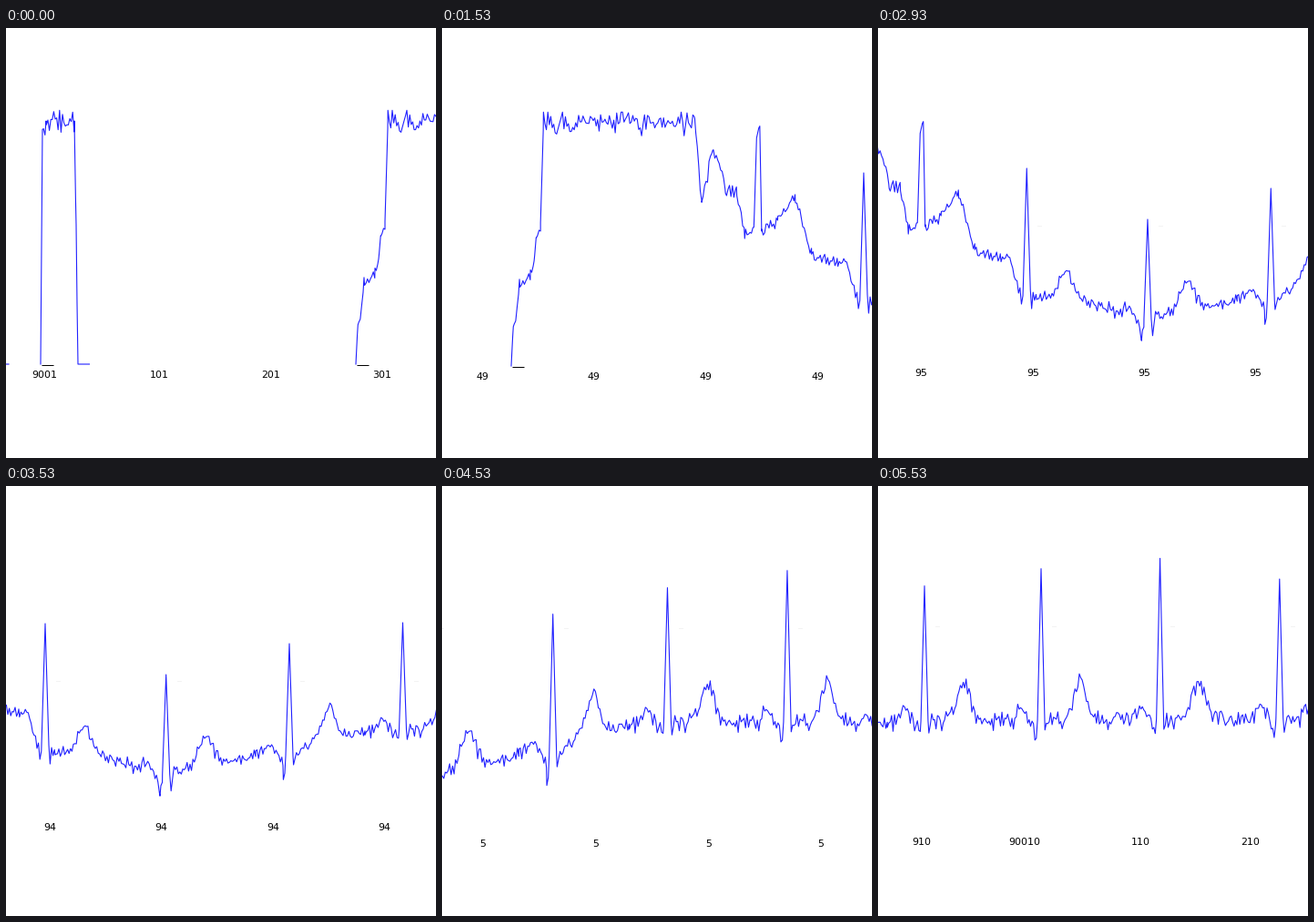
A matplotlib script that plays this animation: 472 by 472 pixels, repeating every 5.6 s.

```python
import matplotlib.pyplot as plt
import numpy as np
from matplotlib.animation import FuncAnimation

SIZE, LOOP = 472, 5600
TICK, STEPS = 20, 84  # clock tick in ms, scroll steps per loop
SAMPLE = 1.223        # pixels per sample
PX = 0.72             # points per pixel at 100 dpi
rng = np.random.default_rng(4)

# Outline of the trace: (position, height above the axis) in pixels
BLOCK = [(38, 0), (40, 251), (44, 267), (75, 267), (77, 150), (79, 0), (91.5, 0)]
RISE = [(384, 0), (386.3, 46), (389, 53), (393, 88), (405, 100), (409, 112),
        (411.5, 140), (416, 152), (419, 267), (584.5, 267)]
FALL = [(592, 179), (604, 238), (612, 222), (618, 190), (630, 195),
        (639, 143), (649, 145), (652, 255), (655.5, 264), (657.5, 148),
        (675, 160), (694, 183), (712, 122), (740, 111), (763, 82)]
REST = [(780, 72), (850, 62), (895, 45), (935, 55), (1000, 70), (1030, 63),
        (1060, 80), (1120, 95), (1600, 98)]

BEAT_X = np.array([769, 901.7, 1037, 1161.5, 1291.7, 1424.5, 1558])
BEAT_TOP = [212, 156, 190, 213, 228, 237, 219]

# step, left edge, zoom, axis y, first tick value
VIEW = np.array([
    (0, 0, 1, 369, 1),
    (11, 140, 1, 369, 115),
    (23, 308.4, 1.005, 371, 249),
    (35, 485.5, 1, 369, 396),
    (53, 726, 1, 363, 594),
    (68, 916.5, 1.01, 380, 750),
    (83, 1109.6, 0.983, 378, 910),
])
GAIN_STEP = 61  # the vertical scale jumps here


def bump(x, centre, width):
    return np.exp(-((x - centre) / width) ** 2 / 2)


def trace(keys, beats=()):
    """Noisy line through the keys, with a heartbeat shape at every beat."""
    kx, kh = np.array(keys).T
    corners = [bx + d for bx, _ in beats for d in (-4, 0, 4)]
    x = np.unique(np.concatenate([kx, np.arange(kx[0], kx[-1], 1.6), corners]))
    h = np.interp(x, kx, kh)
    noise = np.clip(rng.normal(0, 1, x.size), -2.2, 1.8)
    h += noise * np.select([h > 258, h > 40], [6.5, 4], 0)
    for bx, top in beats:
        d = x - bx
        h += 33 * bump(d, 43, 7) + 13 * bump(d, -22, 4)
        h -= 15 * bump(d, -6, 1.5) + 12 * bump(d, 5, 1.2)
        low = np.interp(bx, kx, kh)
        h = np.maximum(h, low + (top - low) * (1 - abs(d) / 4) - 99 * (abs(d) > 4))
    return np.column_stack([x, h])


GAP = [(np.nan, np.nan)]
TRACE = np.vstack([
    [(-5, 0), (3, 0)], GAP, trace(BLOCK), GAP,
    trace(RISE + FALL + REST, list(zip(BEAT_X, BEAT_TOP))),
])

fig = plt.figure(figsize=(SIZE / 100, SIZE / 100), dpi=100, facecolor="white")
ax = fig.add_axes([0, 0, 1, 1])
ax.set(xlim=(0, SIZE), ylim=(SIZE, 0))
ax.axis("off")

grid, = ax.plot([], [], color="#f3f3f3", lw=PX)
wave, = ax.plot([], [], color="#2020ff", lw=1.1 * PX, solid_joinstyle="round")
axis, = ax.plot([], [], color="black", lw=PX, solid_capstyle="butt")
labels = [ax.text(0, 0, "", family="DejaVu Sans", size=11 * PX, color="black",
                  ha="right", va="center_baseline") for _ in range(4)]


def tick_text(first, i):
    """Full value where the counter wraps, otherwise its last two digits."""
    if 10 <= first < 900:
        return f"{first % 100:02d}".rstrip("0")
    value = (first + 100 * i) % 1000
    return f"900{value}" if value < 100 else str(value)


def dashes(starts, length):
    """Separate horizontal strokes as one x array."""
    return np.array([v for s in starts for v in (s, s + length, np.nan)])


def draw(tick):
    step = int((tick + 0.7) * TICK * STEPS / LOOP)
    left, zoom, base, first = (
        np.interp(step, VIEW[:, 0], col) for col in VIEW.T[1:])
    gain, level = (1, 2) if step < GAIN_STEP else (1.26, 3)

    def to_x(x):
        return (x - left) * zoom

    wave.set_data(to_x(TRACE[:, 0]), base - TRACE[:, 1] * gain)
    for line, starts, length, y in ((axis, (39, 385), 12.5, base),
                                    (grid, BEAT_X + 12, 4, base - 75 * level)):
        x = to_x(dashes(starts, length))
        line.set_data(x, np.full(x.size, round(y) + 0.5))

    for i, label in enumerate(labels):
        text = tick_text(round(first), i)
        right = to_x((first - 1 + 100 * i) * SAMPLE) + 56
        label.set_text(text)
        label.set_position((right - 7 * (len(text) == 1), base + 11.5))
    return [grid, wave, axis, *labels]


anim = FuncAnimation(fig, draw, frames=LOOP // TICK, interval=TICK,
                     repeat=True, repeat_delay=0, blit=False)
plt.show()
```
